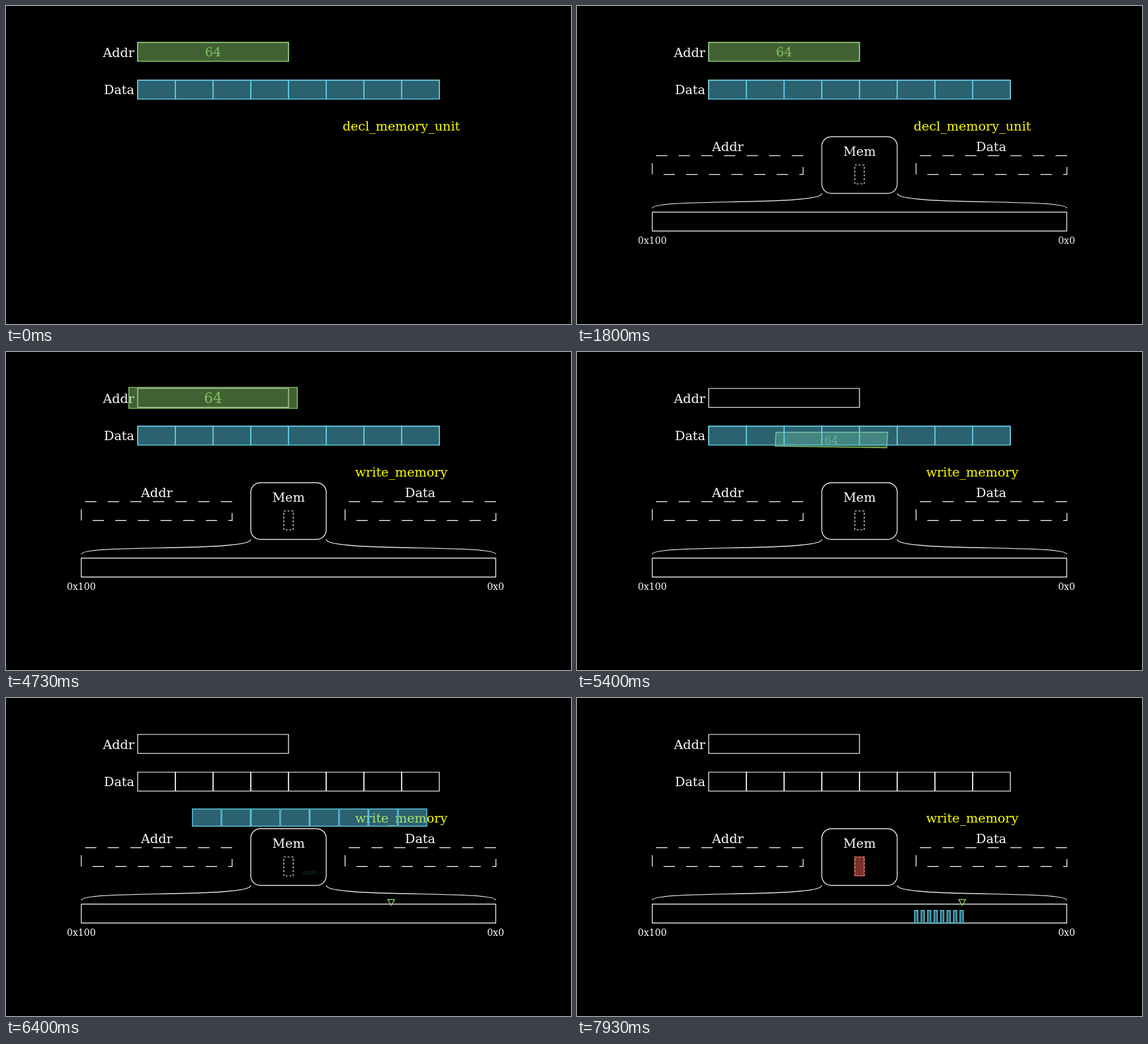
An HTML page with a canvas for the animation above (8000 ms loop, 854 by 480 pixels).

```html
<!DOCTYPE html>
<html lang="en">
<head>
<meta charset="utf-8">
<title>Memory write</title>
<style>
  html, body { margin: 0; width: 100%; height: 100%; overflow: hidden; background: #000; }
  canvas { display: block; width: 854px; height: 480px; }
</style>
</head>
<body>
<canvas id="stage" width="854" height="480"></canvas>
<script>
const ctx = document.getElementById('stage').getContext('2d');
const LOOP = 8000, FPS = 15;
const WHITE = '#fff', YELLOW = '#ff0', GREEN = '#83c167', BLUE = '#58c4dd', RED = '#fc6255';
const UNIT = 28.5, CELL = 2 * UNIT, CELLS = 8;
const LEFT = 113.5, RIGHT = 740.5, SLOT = (RIGHT - LEFT) / 64;
const ADDR = { x: 199, y: 55, w: 8 * UNIT, h: UNIT };
const DATA_Y = 112;

const lerp = (a, b, k) => a + (b - a) * k;
const clamp = v => Math.min(1, Math.max(0, v));
const sigmoid = v => 1 / (1 + Math.exp(-v));

function smooth(t) {
  const edge = sigmoid(-5);
  return clamp((sigmoid(10 * (clamp(t) - 0.5)) - edge) / (1 - 2 * edge));
}
const thereAndBack = t => smooth(t < 0.5 ? 2 * t : 2 - 2 * t);

function faded(alpha, draw) {
  if (alpha <= 0) return;
  ctx.save();
  ctx.globalAlpha *= alpha;
  draw();
  ctx.restore();
}

function label(str, x, y, { size = 19.2, color = WHITE, align = 'center' } = {}) {
  ctx.font = `${size}px "DejaVu Serif", serif`;
  ctx.textAlign = align;
  ctx.fillStyle = color;
  ctx.fillText(str, x, y);
}

function outline(color = WHITE, width = 1.2) {
  ctx.strokeStyle = color;
  ctx.lineWidth = width;
  ctx.stroke();
}

function trace(points) {
  ctx.beginPath();
  points.forEach(([x, y]) => ctx.lineTo(x, y));
  ctx.closePath();
}

// Corners run counterclockwise from the upper right.
const corners = (x, y, w, h) => [[x + w, y], [x, y], [x, y + h], [x + w, y + h]];

function box(x, y, w, h) {
  trace(corners(x, y, w, h));
  outline();
}

function dashedBox(x, y, w, h) {
  const dash = (w + h) / 15;
  ctx.setLineDash([dash, dash]);
  box(x, y, w, h);
  ctx.setLineDash([]);
}

function tinted(points, color, fill = 0.5, stroke = 1) {
  trace(points);
  faded(fill, () => { ctx.fillStyle = color; ctx.fill(); });
  faded(stroke, () => outline(color, 1.4));
}

function registers() {
  label('Addr', 194, 76.5, { align: 'right' });
  label('Data', 194, 133.3, { align: 'right' });
  box(ADDR.x, ADDR.y, ADDR.w, ADDR.h);
  for (let i = 0; i < CELLS; i++) box(ADDR.x + i * CELL, DATA_Y, CELL, UNIT);
}

function brace(from, to) {
  ctx.beginPath();
  ctx.moveTo(from, 282.8);
  ctx.bezierCurveTo(from, 302, to, 290, to, 305.3);
  outline();
}

function memoryUnit() {
  ctx.beginPath();
  ctx.roundRect(370, 197.3, 4 * UNIT, 3 * UNIT, UNIT / 2);
  outline();
  label('Mem', 427, 225.6);
  dashedBox(419.9, 240, UNIT / 2, UNIT);
  label('Addr', 227.8, 218.6);
  dashedBox(LEFT + 0.3, 225.8, 8 * UNIT, UNIT);
  label('Data', 626, 218.6);
  dashedBox(512.5, 225.8, 8 * UNIT, UNIT);
  brace(370, LEFT + 0.3);
  brace(484, RIGHT - 0.3);
  box(LEFT + 0.3, 311.2, RIGHT - LEFT - 0.6, UNIT);
  label('0x100', LEFT + 0.3, 359.3, { size: 14 });
  label('0x0', RIGHT - 0.5, 359.3, { size: 14 });
}

// The address value pulses, then shrinks into the pointer above the memory bar.
function address(t) {
  const zoom = 1 + 0.2 * thereAndBack(clamp(t - 4));
  const k = smooth(t - 5);
  const cx = ADDR.x + ADDR.w / 2, cy = ADDR.y + ADDR.h / 2;
  const w = ADDR.w * zoom, h = ADDR.h * zoom;
  const pointer = [[587.4, 304.2], [582.2, 304.2], [577, 304.2], [582.2, 313.2]];
  const shape = corners(cx - w / 2, cy - h / 2, w, h)
    .map(([x, y], i) => [lerp(x, pointer[i][0], k), lerp(y, pointer[i][1], k)]);
  tinted(shape, GREEN, 0.5 * (1 - k));
  faded(1 - k, () => {
    ctx.translate(lerp(cx, 582.2, k), lerp(cy, 308, k));
    ctx.scale(zoom * lerp(1, 0.45, k), zoom * lerp(1, 0.6, k));
    label('64', 0, 7.1, { color: GREEN });
  });
}

function data(t) {
  const k = smooth(t - 6);
  const barW = SLOT / 2, barH = UNIT * 2 / 3, barY = 320.7;
  for (let i = 0; i < CELLS; i++) {
    const barX = 583.8 - (CELLS - 1 - i) * SLOT - barW;
    // A dim copy grows out of the stage centre.
    if (k > 0 && k < 1) {
      tinted(corners(lerp(427, barX, k), lerp(240, barY, k), barW * k, barH * k), BLUE, 0.18 * k, 0.28 * k);
    }
    tinted(corners(
      lerp(ADDR.x + i * CELL, barX, k), lerp(DATA_Y, barY, k),
      lerp(CELL, barW, k), lerp(UNIT, barH, k)), BLUE);
  }
}

function render(t) {
  ctx.fillStyle = '#000';
  ctx.fillRect(0, 0, 854, 480);
  registers();
  faded(smooth(t - 1), memoryUnit);

  const swap = smooth(t - 2);
  faded(1 - swap, () => label('decl_memory_unit', 597.5, 187.7, { color: YELLOW }));
  faded(swap, () => label('write_memory', 597.5, 187.7, { color: YELLOW }));

  address(t);
  data(t);
  faded(smooth(t - 7), () => tinted(corners(419.9, 240, UNIT / 2, UNIT), RED, 0.5, 0.5));
}

function tick(now) {
  const step = Math.floor((now % LOOP) * FPS / 1000 + 0.06);
  render(step % (LOOP * FPS / 1000) / FPS);
  requestAnimationFrame(tick);
}
requestAnimationFrame(tick);
</script>
</body>
</html>
```
